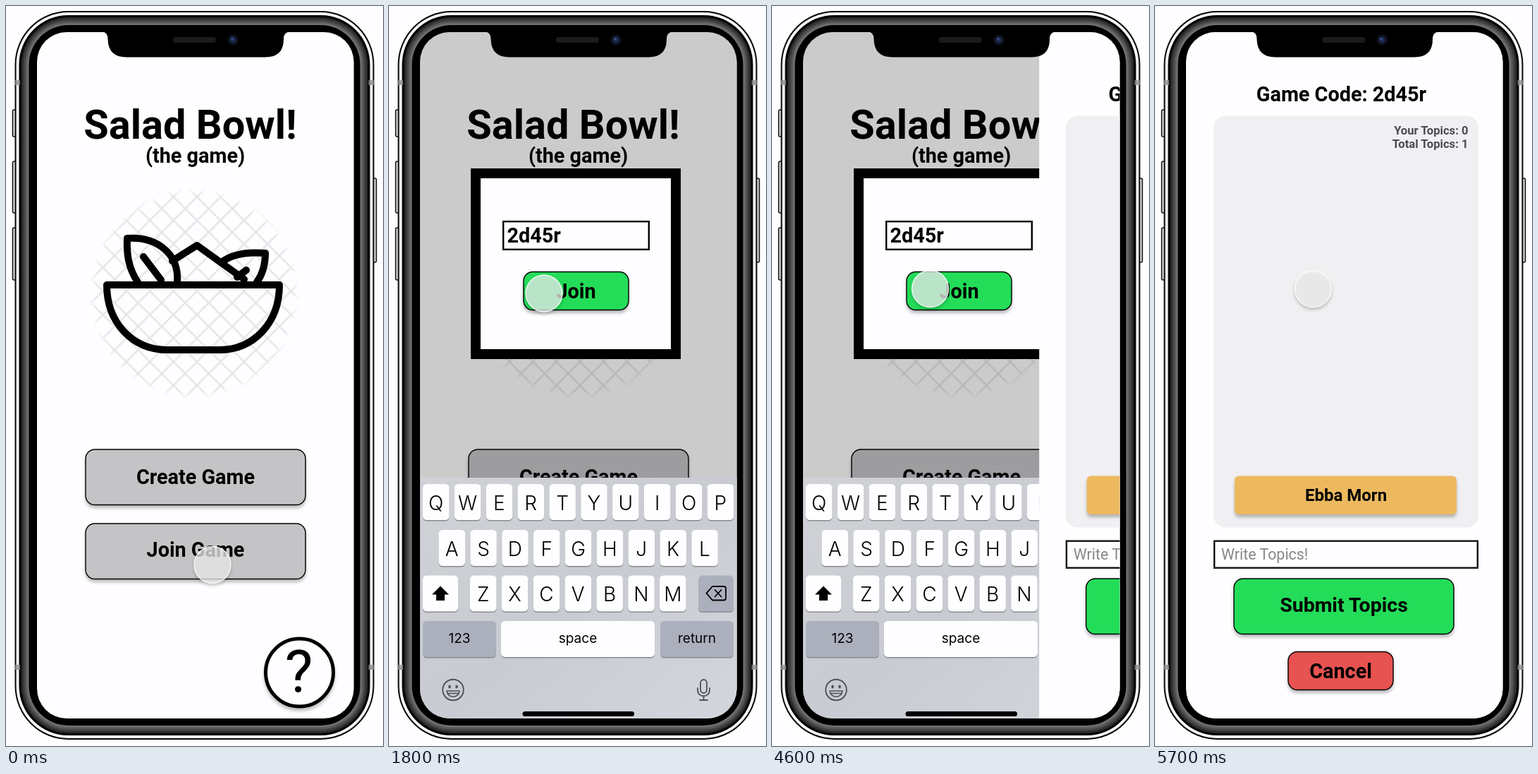
Animation of 535 by 1048 pixels, one loop 5.8 s. Source, as an HTML page:

```html
<!DOCTYPE html>
<html lang="en">
<head>
<meta charset="utf-8">
<title>Salad Bowl prototype</title>
<style>
  html, body { margin: 0; width: 100%; height: 100%; overflow: hidden; background: #fefdff; }
  svg { display: block; width: 100vw; height: 100vh; }
  text { font-family: Roboto, sans-serif; font-weight: 700; font-size: 28.8px; text-anchor: middle; }
  .key { font-family: Inter, sans-serif; font-weight: 300; font-size: 28px; }
  .word { font-family: Inter, sans-serif; font-weight: 400; font-size: 19px; }
  .raised { filter: drop-shadow(0 4px 2px rgba(0, 0, 0, .25)); }
  .line { fill: none; stroke: #000; stroke-linejoin: round; stroke-linecap: round; }
</style>
</head>
<body>
<svg viewBox="0 0 535 1048" preserveAspectRatio="none">
  <defs>
    <clipPath id="display"><rect x="44" y="37" width="449.5" height="972" rx="42"/></clipPath>
    <pattern id="lattice" width="23.6" height="23.6" patternUnits="userSpaceOnUse" patternTransform="translate(271 402) rotate(45)">
      <path d="M0 0H23.6M0 0V23.6" stroke="#e6e5e8" stroke-width="5"/>
    </pattern>
    <radialGradient id="fade">
      <stop offset=".93" stop-color="#fff"/>
      <stop offset="1" stop-color="#000"/>
    </radialGradient>
    <mask id="disc"><circle cx="267" cy="407" r="150" fill="url(#fade)"/></mask>
    <linearGradient id="board" x1="0" y1="0" x2="1" y2="1">
      <stop offset="0" stop-color="#d0d2d7"/>
      <stop offset=".5" stop-color="#c8cbd1"/>
      <stop offset="1" stop-color="#d3d6dc"/>
    </linearGradient>
  </defs>
  <g id="phone"></g>
  <g clip-path="url(#display)">
    <rect x="44" y="37" width="450" height="972" fill="#fefdff"/>
    <g id="base">
      <g id="home"></g>
      <g id="dialog"></g>
    </g>
    <g id="lobby"></g>
  </g>
  <g id="notch"></g>
  <g id="touch">
    <circle r="26" fill="#f5f5f6" fill-opacity=".73" stroke="#fff" stroke-opacity=".85" stroke-width="1.4"
      style="filter: drop-shadow(0 3px 2px rgba(0, 0, 0, .25))"/>
  </g>
</svg>
<script>
const el = id => document.getElementById(id);
const rect = (x, y, w, h, r, fill, more = '') =>
  `<rect x="${x}" y="${y}" width="${w}" height="${h}" rx="${r}" fill="${fill}" ${more}/>`;
const text = (x, y, s, more = '') => `<text x="${x}" y="${y}" ${more}>${s}</text>`;
const path = (d, width, more = '') => `<path class="line" d="${d}" stroke-width="${width}" ${more}/>`;
const button = (x, y, w, h, fill, label, baseline, size = 28.8) =>
  rect(x, y, w, h, 13, fill, 'class="raised" stroke="#000" stroke-width="1.4"') +
  text(x + w / 2, baseline, label, `style="font-size:${size}px"`);

function phone() {
  const ring = (inset, fill) => rect(12.5 + inset, 7 + inset, 510 - 2 * inset, 1032 - 2 * inset, 76 - inset, fill);
  const side = (x, y, h) => rect(x, y, 6, h, 2, '#e4e4e7', 'stroke="#111" stroke-width="1.6"');
  let s = side(9.5, 147, 38) + side(9.5, 220, 73) + side(9.5, 314, 74) + side(519.5, 244, 119);
  s += ring(0, '#050505') + ring(2, '#f6f5f8') + ring(6, '#000');
  for (let i = 0; i < 6; i++) {
    const v = 38 + i * 15;
    s += ring(9 + i * 1.8, `rgb(${v},${v},${v})`);
  }
  s += ring(20, '#000');
  for (const y of [105, 933])
    for (const x of [12, 514.5]) s += rect(x, y, 8, 7, 0, '#8c8c90', 'opacity=".8"');
  return s;
}

function notch() {
  return '<path d="M134 35.5C142 37 144.500 40 144.500 47Q145 72.500 171 72.500H368Q394 72.500 394 47C394 40 397 37 405 35.500Z"/>' +
    rect(237, 44, 61, 8, 4, '#1b1b1d') +
    '<circle cx="322" cy="48" r="7.500" fill="#10131f"/><circle cx="322" cy="48" r="4" fill="#1d2c55"/>' +
    '<circle cx="321" cy="46.500" r="1.500" fill="#3b5290"/>';
}

function home() {
  return text(261.5, 188, 'Salad Bowl!', 'style="font-size:57.7px"') +
    text(268.5, 222, '(the game)') +
    rect(117, 257, 300, 300, 0, 'url(#lattice)', 'mask="url(#disc)"') +
    path('M143 395H388C388 449 351 487 303 487H229C180 487 143 449 143 395Z', 10) +
    path('M187 391C174 372 171 352 172 329C213 326 246 350 243 391', 10) +
    path('M195 355L220 388M236 361L271 339L338 387', 10) +
    path('M307 362C323 350 344 348 368 350C368 367 364 380 356 391M341 374L328 384', 10) +
    button(113, 628, 312, 78.5, '#c4c3c5', 'Create Game', 677) +
    button(113, 733, 312, 78.5, '#c4c3c5', 'Join Game', 780) +
    '<circle class="raised" cx="416.500" cy="944" r="48" fill="#fefdff" stroke="#000" stroke-width="5"/>' +
    text(415.5, 972, '?', 'style="font-size:84px;font-weight:400"');
}

function keyboard() {
  const grey = '#abb0bc';
  const cap = (x, y, w, fill = '#fefdff') =>
    rect(x, y + 1.6, w, 51, 5.5, '#898b90') + rect(x, y, w, 51, 5.5, fill);
  let s = rect(44, 668, 450, 342, 0, 'url(#board)');
  const rows = [['QWERTYUIOP', 48, 677], ['ASDFGHJKL', 70.5, 742], ['ZXCVBNM', 115, 806.5]];
  for (const [letters, x0, y] of rows)
    [...letters].forEach((c, i) => {
      const x = x0 + i * 44.85;
      s += cap(x, y, 37.5) + text(x + 18.7, y + 36.5, c, 'class="key"');
    });
  s += cap(48, 806.5, 50) + cap(439, 806.5, 50, grey);
  s += '<path d="M73 821.500L85 833.500H79V842H67V833.500H61Z"/>';
  s += path('M459 822H475Q478 822 478 825V838.500Q478 841.500 475 841.500H459L450.500 831.700ZM462.500 827L471.500 836.500M471.500 827L462.500 836.500', 1.8);
  s += cap(48, 871, 104, grey) + cap(159, 871, 218) + cap(385, 871, 104, grey);
  s += text(100, 902, '123', 'class="word"') + text(268, 902, 'space', 'class="word"') + text(437, 902, 'return', 'class="word"');
  const ink = 'style="stroke:#4f5257"';
  s += '<circle cx="91" cy="968.500" r="14.800" fill="none" stroke="#4f5257" stroke-width="1.900"/>' +
    '<ellipse cx="86" cy="964" rx="1.800" ry="2.600" fill="#4f5257"/><ellipse cx="96" cy="964" rx="1.800" ry="2.600" fill="#4f5257"/>' +
    path('M82 970H100C99 981 83 981 82 970ZM83 973.500H99', 1.7, ink);
  s += rect(442, 954, 9, 19, 4.5, 'none', 'stroke="#4f5257" stroke-width="1.800"') +
    path('M438 966V969C438 980 455 980 455 969V966M446.500 977.500V983M441 983H452', 1.8, ink);
  return s + rect(189.5, 999, 158.5, 7, 3.5, '#000');
}

function dialog() {
  return rect(44, 37, 450, 972, 0, '#000', 'opacity=".2"') +
    rect(116, 230, 298, 270, 0, '#000') + rect(130, 244, 270, 242, 0, '#fefdff') +
    rect(162.2, 305.2, 206.6, 39.6, 0, '#fefdff', 'stroke="#000" stroke-width="2.400"') +
    rect(169.5, 317, 1.5, 19, 0, '#222', 'id="caret"') +
    text(167.5, 335, '2d45r', 'id="code" style="text-anchor:start"') +
    button(191, 376.5, 149, 54, '#23dd59', 'Join', 414) +
    keyboard();
}

function lobby() {
  const count = (y, s) => text(444.5, y, s, 'fill="#4b4a4e" style="font-size:16.6px;text-anchor:end"');
  return rect(45.5, 37, 460, 972, 0, '#fefdff') +
    text(264.5, 135, 'Game Code: 2d45r') +
    rect(83, 155.5, 376, 583, 17, '#f0eff2') +
    count(182, 'Your Topics: 0') + count(201, 'Total Topics: 1') +
    rect(113, 665.5, 315, 54.5, 6, '#edb95f', 'class="raised"') +
    text(271, 701, 'Ebba Morn', 'style="font-size:24px"') +
    rect(84.2, 757.7, 373.6, 38, 0, '#fefdff', 'stroke="#111" stroke-width="2.400"') +
    text(94, 784, 'Write Topics!', 'fill="#878689" style="font-size:21.4px;font-weight:400;text-anchor:start"') +
    button(112, 811, 312, 78.5, '#23dd59', 'Submit Topics', 858, 28.5) +
    button(189, 914.5, 149, 54, '#e65351', 'Cancel', 952);
}

const parts = { phone, notch, home, dialog, lobby };
for (const id in parts) el(id).innerHTML = parts[id]();

const LOOP = 5800, OPEN_AT = 300, CODE_AT = 1500;

// Rows: time, value, slope per ms
const touchX = [[200, 293, 0], [700, 278, 0], [1300, 220, 0], [2000, 220, 0], [2500, 224.5, 0]];
const touchY = [[200, 791.5, 0], [700, 709, -.2], [1300, 425, -.06], [1800, 407, -.02], [2500, 400.5, 0]];
const slide = [[3600, 448, 0], [4600, 334, -.3], [5200, 69, -.2], [5500, 33, -.14], [5700, 0, 0]];

function along(keys, t) {
  if (t <= keys[0][0]) return keys[0][1];
  const i = keys.findIndex(k => k[0] >= t);
  if (i < 0) return keys[keys.length - 1][1];
  const [t0, a, m] = keys[i - 1], [t1, b, n] = keys[i];
  const d = t1 - t0, u = (t - t0) / d, v = 1 - u;
  return v * v * (1 + 2 * u) * a + u * u * (3 - 2 * u) * b + d * u * v * (v * m - u * n);
}

const show = (id, on) => el(id).setAttribute('visibility', on ? 'inherit' : 'hidden');

function draw(t) {
  const left = along(slide, t);
  show('dialog', t >= OPEN_AT);
  show('caret', t < CODE_AT);
  show('code', t >= CODE_AT);
  show('base', left > 0);
  el('lobby').setAttribute('transform', `translate(${left} 0)`);
  el('touch').setAttribute('transform', `translate(${along(touchX, t)} ${along(touchY, t)})`);
}

const start = performance.now();
function tick() {
  draw((performance.now() - start) % LOOP);
  requestAnimationFrame(tick);
}
tick();
</script>
</body>
</html>
```
